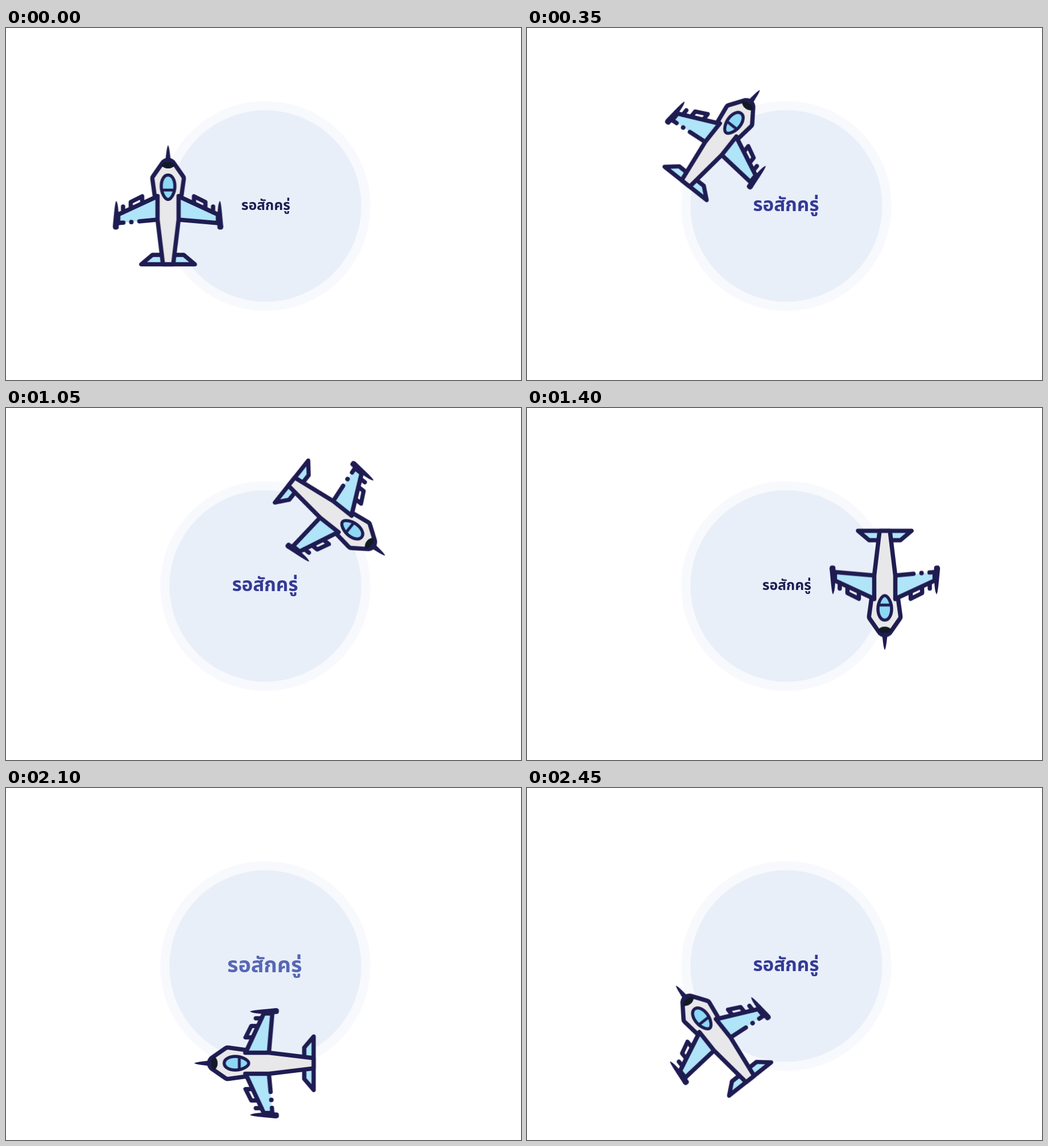
Animation, 904 px wide and 619 px high, one loop 2800 ms. Source, as an HTML page:

```html
<!DOCTYPE html>
<html lang="th">
<head>
<meta charset="utf-8">
<title>รอสักครู่</title>
<style>
  html, body { margin: 0; width: 100%; height: 100%; overflow: hidden; background: #fff; }
  svg { display: block; width: 100vw; height: 100vh; }

  .plane { animation: fly 2800ms step-end infinite; }
  .label { animation: pulse 1400ms step-end infinite; }

  @keyframes fly {
    0%    { transform: translate(284.5px, 313px); }
    12.5% { transform: translate(342.2px, 193px) rotate(38.4deg); }
    25%   { transform: translate(457px, 141px) rotate(90deg); }
    37.5% { transform: translate(581.6px, 193.1px) rotate(128.4deg); }
    50%   { transform: translate(628px, 318.5px) rotate(180deg); }
    62.5% { transform: translate(566.9px, 448.7px) rotate(218.4deg); }
    75%   { transform: translate(437.5px, 484px) rotate(270deg); }
    87.5% { transform: translate(327.9px, 431.4px) rotate(-38.4deg) scaleX(-1); }
    100%  { transform: translate(284.5px, 313px); }
  }
  @keyframes pulse {
    0%   { transform: translate(456px, 311px) scale(.656); color: #1f1c52; }
    25%  { transform: translate(454.6px, 311px) scale(.883); color: #343a95; }
    50%  { transform: translate(454px, 311px); color: #5767b5; }
    75%  { transform: translate(454.6px, 311px) scale(.883); color: #343a95; }
    100% { transform: translate(456px, 311px) scale(.656); color: #1f1c52; }
  }

  .label text {
    font: 600 37.5px "Noto Sans Thai", "Noto Sans", sans-serif;
    text-anchor: middle;
    fill: currentColor;
  }
  .strokes { display: none; fill: none; stroke: currentColor; stroke-width: 4.6; stroke-linejoin: round; }
  .no-thai text { display: none; }
  .no-thai .strokes { display: inline; }

  .line { fill: none; stroke: #1f1c52; stroke-width: 7.5; stroke-linecap: round; stroke-linejoin: round; }
  .ink { fill: #1f1c52; }
  .sky { fill: #b0e4f8; }
  .hull { fill: #e8e8ea; }
</style>
</head>
<body>
<svg viewBox="0 0 904 619" preserveAspectRatio="none">
  <defs>
    <!-- wing parts shared by both sides, mirrored about x = 284.5 -->
    <g id="wing">
      <path class="sky" d="M266 296 L196 328 V343 L266 337Z"/>
      <path class="line" d="M266 296 L197 328 V343"/>
      <path class="line" d="M219 315 V306 L239 296 V306 M205.5 314 V324"/>
      <path class="ink" d="M193.5 304 C191 307 190 325 187.5 349 Q187.5 354.5 192 354.5 H194 Q198 354 198 350 V346 H200 V330 L197.5 325 C197 315 196 307 193.5 304Z"/>
    </g>
    <path id="ro" d="M-48.5 -8 H-56 Q-61 -8 -61 -4 Q-61 -.5 -56 0 Q-49.5 1 -49.5 6 Q-49.5 11 -54 11 H-58"/>
  </defs>

  <circle cx="455.3" cy="313" r="184.5" fill="#f7f9fd"/>
  <circle cx="455.3" cy="313" r="168.4" fill="#e9eff9"/>

  <g class="label">
    <text y="13">รอสักครู่</text>
    <!-- lettering for systems without a Thai font -->
    <g class="strokes">
      <use href="#ro"/>
      <path d="M-42 -6 Q-40 -8 -35 -8 Q-27 -8 -27 -1 V4 Q-27 11 -34 11 Q-41 11 -41 5 V2 H-35"/>
      <path d="M-18 -6 Q-16 -8 -12 -8 Q-4 -8 -4 -1 V13 M-4 3 Q-8 1 -12 1 Q-18 1 -18 6 Q-18 11 -12 11 M-5 -5 L1 -10"/>
      <path d="M-9 -18 Q-9 -14 -5 -14 Q1 -14 2 -18"/>
      <path d="M6 13 V3 Q6 0 3 -2 Q5 -8 12 -8 Q19 -8 19 -1 V13"/>
      <path d="M27 13 V-1 Q27 -8 34 -8 Q42 -8 42 -1 V13 M27 8 Q34 7 34 1"/>
      <use href="#ro" x="110"/>
      <path d="M55 15 V17 Q55 20 58 20 Q61 20 61 15 M60 -18 V-12"/>
    </g>
  </g>

  <g class="plane">
    <g transform="translate(-284.5 -313)">
      <path class="line sky" style="fill:#b0e4f8" d="M273 399 H257 L237.5 415.5 H331.5 L312 399 H296"/>
      <use href="#wing"/>
      <use href="#wing" transform="translate(569) scale(-1 1)"/>
      <path class="line" d="M266 337 L234 340 M206 342.3 L197 343 M303 337 L372 343"/>
      <circle class="ink" cx="220" cy="341.3" r="4"/>

      <path class="ink" d="M284.5 206 C282 209 281 225 279.5 234 H289.5 C288 225 287 209 284.5 206Z"/>
      <path class="hull" d="M261 296 L257 266 Q256.5 263 258 261 L274 238 Q278 232 284.5 232 Q291 232 295 238 L311 261 Q312.5 263 312 266 L308 296 H303 V337 L293.5 415 H275.5 L266 337 V296Z"/>
      <path class="line" d="M261 295 L257 266 Q256.5 263 258 261 L274 238 Q278 232 284.5 232 Q291 232 295 238 L311 261 Q312.5 263 312 266 L308 295"/>
      <path class="line" d="M266 295.5 V337 L275.5 415.5 H293.5 L303 337 V295.5"/>
      <path fill="#111a26" d="M272 241 Q278 235.5 284.5 235.5 Q291 235.5 297 241 Q292 247 284.5 247 Q277 247 272 241Z"/>

      <path class="line" style="fill:#8dd8f5;stroke-width:5.5" d="M284.5 258.5 C292 258.5 296.5 268 296.5 278 C296.5 290 290 301.5 284.5 301.5 C279 301.5 272.5 290 272.5 278 C272.5 268 277 258.5 284.5 258.5Z"/>
      <path class="line" style="stroke-width:5" d="M274 285 H295"/>
    </g>
  </g>
</svg>
<script>
  // Placeholder boxes all share one width; real Thai letters do not.
  const pen = document.createElement('canvas').getContext('2d');
  pen.font = '600 40px "Noto Sans Thai", "Noto Sans", sans-serif';
  const width = letter => pen.measureText(letter).width;
  if (width('ร') === width('ส')) document.querySelector('.label').classList.add('no-thai');
</script>
</body>
</html>
```
